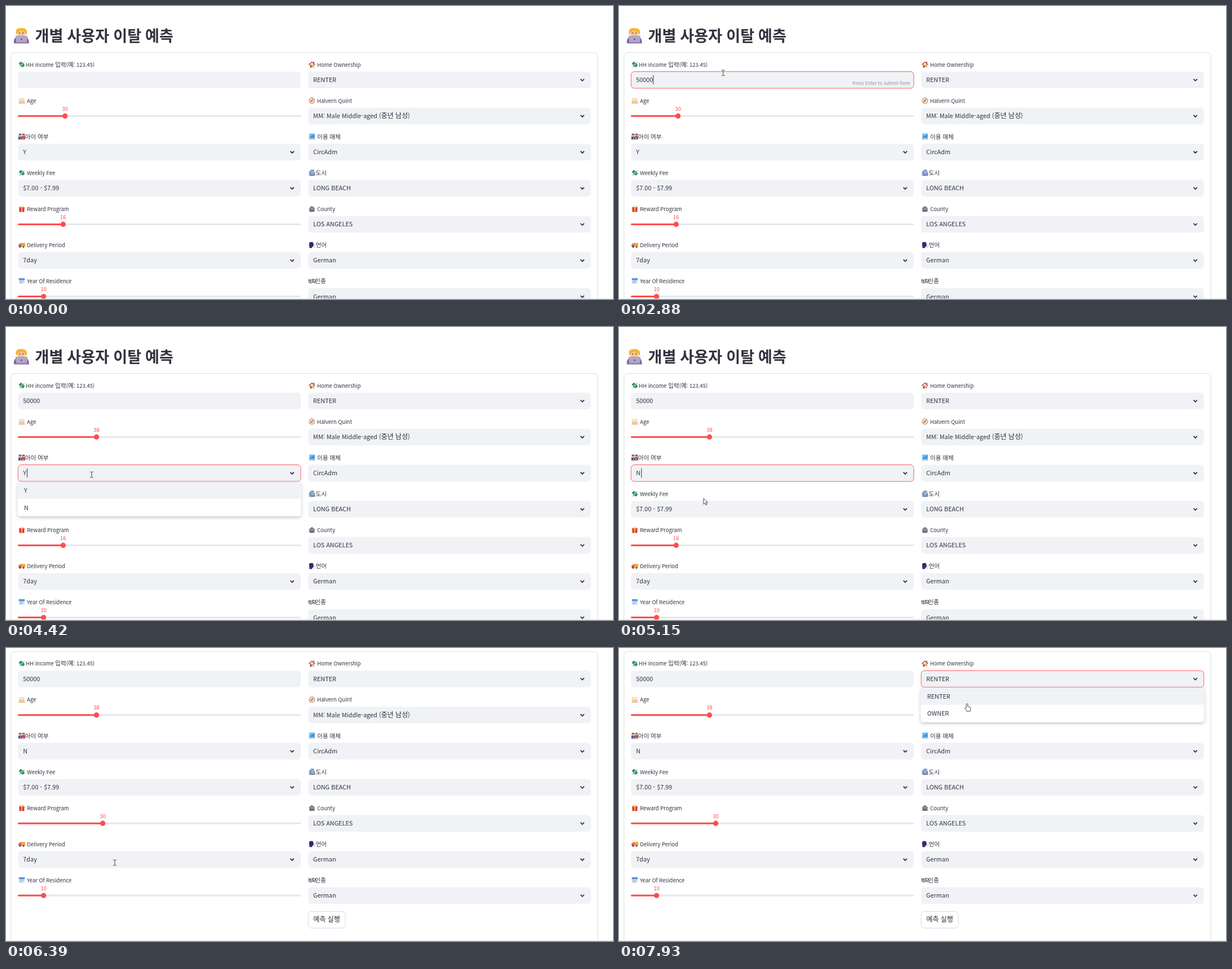
Animation, 1077 px wide and 520 px high, one loop 8 s. Source, as an HTML page:

```html
<!DOCTYPE html>
<html lang="ko">
<head>
<meta charset="utf-8">
<title>개별 사용자 이탈 예측</title>
<style>
html, body { margin: 0; height: 100%; overflow: hidden; background: #fff; }
svg { display: block; width: 100vw; height: 100vh; }
text { font-family: "Noto Sans CJK KR", "Noto Sans CJK", "Noto Sans KR", "Noto Sans", sans-serif; fill: #31333f; white-space: pre; }
.red { fill: #ff4b4b; }
.hint { fill: #8e8f97; }
.menu > .card { fill: #fff; filter: drop-shadow(0 2px 3px #0003); }
</style>
</head>
<body>
<svg id="stage" viewBox="0 0 1077 520"></svg>
<script>
const LOOP = 8000, PITCH = 64.07, WIDTH = 502.3, COLS = [21, 535.8];
const SIZE = 12.13, SMALL = 10.61, LATIN = 0.895;
const $ = id => document.getElementById(id);
const rowY = i => 131.1 + PITCH * i;
const path = (fill, d) => `<path fill="${fill}" d="${d}"/>`;
const dot = (fill, x, y, r) => `<circle fill="${fill}" cx="${x}" cy="${y}" r="${r}"/>`;
const box = (x, y, w, h, attrs) => `<rect x="${x}" y="${y}" width="${w}" height="${h}" ${attrs}/>`;

// Latin runs are set a little smaller than Hangul
const runs = (s, size) => s.replace(/[ -~]+/g, m => `<tspan font-size="${size * LATIN}">${m}</tspan>`);
const text = (x, y, s, size = SIZE, attrs = '') =>
  `<text x="${x}" y="${y}" font-size="${size}" ${attrs}>${runs(s, size)}</text>`;

// Pictograms in a 12 by 12 box
const icons = {
  money: path('#bcc6c8', 'M6 4l5-3-1 6zM4 6l-3 5 6-1z') + path('#2b8f5a', 'M.5 4.5L4.5 .8 11.5 7.5 7.8 11.2z') + dot('#9bd9b4', 6, 6, 1.6),
  cake: path('#f1b45f', 'M2 1.5h1.2V6H2zM5.4 1h1.2v5H5.4zM8.8 1.5H10V6H8.8z') + path('#f7dcbc', 'M1 5h10v6H1z') + path('#d9a673', 'M1 7.5h10v1H1zM0 10.3h12v1H0z'),
  family: path('#3c4f8c', 'M0 6h6v5H0z') + path('#b64a5c', 'M6 6h6v5H6z') + path('#4b3038', 'M.8 1h4.4v4H.8zM6.8 1h4.4v5H6.8z') +
    dot('#e9b48e', 3, 4, 1.8) + dot('#e9b48e', 9, 4, 1.8) + dot('#4b3038', 4, 8, 1.5) + dot('#e9b48e', 4, 8.7, 1.2) + dot('#4b3038', 8, 8, 1.5) + dot('#e9b48e', 8, 8.7, 1.2),
  gift: path('#d9363e', 'M1.5 5h9v6.5h-9z') + path('#f0514b', 'M1 3h10v2.5H1z') + path('#f6b73c', 'M5 3h2v8.5H5zM6 3L2.5 2 4 .2zM6 3l3.5-1L8 .2z'),
  truck: path('#f0a33a', 'M4 2.5h8V9H4z') + path('#e0483e', 'M.3 9V6l1.5-2.5H5V9z') + path('#8cc9ee', 'M1.2 6l1-1.7h1.6V6z') + dot('#4a4550', 3, 9.5, 1.5) + dot('#4a4550', 9, 9.5, 1.5),
  calendar: path('#dbe6f6', 'M.8 1.5h10.4v9.7H.8z') + path('#3f86d8', 'M.8 1.2h10.4V4H.8z') + path('#7aa7de', 'M2.3 5.2h2v1.5h-2zM5 5.2h2v1.5H5zM7.7 5.2h2v1.5h-2zM2.3 8h2v1.5h-2zM5 8h2v1.5H5z'),
  house: path('#7d5a4a', 'M8.3 1H10v4H8.3z') + path('#efc18d', 'M2 5.5h8.4v6H2z') + path('#d1483c', 'M6 .8L12 6l-1 1.2-5-4.4-5 4.4L0 6z') + path('#8a4d3b', 'M3 7.5h2.3v4H3z') + path('#65b4e8', 'M7 7.5h2.2v2H7z'),
  compass: dot('#d89a62', 6, 6, 5.5) + dot('#f3e6d8', 6, 6, 4.1) + path('#e04d45', 'M9 3L7 7 5 5z') + path('#5a77a8', 'M3 9l4-2-2-2z'),
  screen: path('#3c97e0', 'M1.5 .8h9.5v7.7H1.5z') + path('#6fc3f4', 'M1.5 .8H11L1.5 7z') + path('#a9b4c4', 'M.8 8.7h10.7l.3 2.2H.3z'),
  city: path('#88a4c4', 'M.8 3h4v8.5h-4z') + path('#5f7fae', 'M3.7 .7h6v10.8h-6z') + path('#c5dcf2', 'M5 2.2h1.2v7H5zM7.2 2.2h1.2v7H7.2z') + path('#7d8796', 'M9.5 5h2v6.5h-2z'),
  county: path('#807a8a', 'M6 .8L12 5.4H0z') + path('#a09aa8', 'M1.3 5h9.5v6.3H1.3z') + path('#5c5668', 'M2 6h1.6v5H2zM8.4 6H10v5H8.4zM4.7 7.5h2.6v3.8H4.7z'),
  voice: path('#2d3068', 'M1 4Q1 .7 5 .7T8.5 4L9.7 6.5 8.4 7v2L6.5 9.2v2.3H1.5V8Q.8 6 1 4z') + path('#4a4f86', 'M9.6 8l2.2-.5v1zM9.4 9.3l2 1-.4.7z'),
  map: '<path fill="none" stroke="#31333f" stroke-width=".9" d="M.5 3l3 1.3L7.8 2.6 12 4v5.5L8 8 3.8 9.6.5 8.3zM3.5 4.3v5M7.8 2.6V8M1 6l2-1 2 2 2-2 2 2 2-1"/>'
};
const icon = (name, x, y) => `<g transform="translate(${x} ${y})">${icons[name]}</g>`;

// [icon, label, label x, kind, value]
const fields = [[
  ['money', 'HH income 입력(예: 123.45)', 35.3, 'input', ''],
  ['cake', 'Age', 37.2, 'slider', 'age'],
  ['family', '아이 여부', 33.8, 'select', 'Y'],
  ['money', 'Weekly Fee', 37.2, 'select', '$7.00 - $7.99'],
  ['gift', 'Reward Program', 37.2, 'slider', 'reward'],
  ['truck', 'Delivery Period', 37.2, 'select', '7day'],
  ['calendar', 'Year Of Residence', 37.2, 'slider', 'years']
], [
  ['house', 'Home Ownership', 552, 'select', 'RENTER'],
  ['compass', 'Halvern Quint', 552, 'select', 'MM: Male Middle-aged (중년 남성)'],
  ['screen', '이용 매체', 552, 'select', 'CircAdm'],
  ['city', '도시', 549.6, 'select', 'LONG BEACH'],
  ['county', 'County', 552, 'select', 'LOS ANGELES'],
  ['voice', '언어', 549.6, 'select', 'German'],
  ['map', '인종', 548.2, 'select', 'German']
]];

function field([name, label, labelX, kind, value], col, row) {
  const x = COLS[col], y = rowY(row), id = `${col}${row}`;
  const head = icon(name, x + 1, y - 33.4) + text(labelX, y - 23.5, label, SMALL);
  if (kind === 'slider') return head +
    box(x, y - 1.5, WIDTH, 3, 'rx="1.5" fill="#e4e7ef"') +
    box(x, y - 1.5, 0, 3, `rx="1.5" class="red" id="${value}Bar"`) +
    `<circle id="${value}Dot" class="red" cy="${y}" r="4.6"/>` +
    text(0, y - 9.5, '', SMALL, `id="${value}Num" class="red" text-anchor="middle"`);
  const arrow = kind === 'select' ?
    `<path d="M${x + 483.6} ${y - 1.5}l3.2 3.2 3.2-3.2" fill="none" stroke="#31333f" stroke-width="1.8"/>` : '';
  return head + box(x + .3, y - 14.7, WIDTH - .6, 29.6, `id="box${id}" rx="6" fill="#f0f2f6" stroke-width=".9"`) +
    text(x + 9.3, y + 4, value, SIZE, `id="val${id}"`) + arrow;
}

function menu(id, col, row, items) {
  const x = COLS[col] - .6, y = rowY(row) + 15.6;
  return `<g id="${id}" class="menu">` + box(x, y, WIDTH + 1, 61.5, 'rx="5" class="card"') +
    box(x, y, WIDTH + 1, 30.2, `id="${id}Hover" fill="#f0f2f6"`) +
    items.map((s, i) => text(x + 11.6, y + 19.2 + 30.6 * i, s)).join('') + '</g>';
}

const person = path('#f2b632', 'M18 50Q15 39 27 39T37 50z') + dot('#f4c49a', 27.2, 48, 7) +
  path('#f2b632', 'M20 47Q20 40 27 40T35 46Q29 46 26 43 24 46 20 47z') + path('#5a3f3a', 'M23.5 47h1.5v2h-1.5zM29.5 47H31v2h-1.5z') +
  path('#7a5fb0', 'M14 66Q13 56 20 55H35Q41 56 40.500 66z') + path('#b3a5c6', 'M17 52.500h21l-1 12H18z') +
  path('#8d7fa3', 'M14 64.500h27v2H14z') + dot('#6b5d80', 27.500, 59, 1.5);

$('stage').innerHTML = '<g id="page">' + person +
  text(51.5, 62.7, '개별 사용자 이탈 예측', 27.2, 'font-weight="700"') +
  box(8.8, 82.7, 1041.2, 540, 'rx="6" fill="none" stroke="#dcdde0"') +
  fields.map((list, col) => list.map((f, row) => field(f, col, row)).join('')).join('') +
  text(516.5, 140.4, 'Press Enter to submit form', 9.1, 'id="hint" class="hint" text-anchor="end"') +
  box(536.2, 543.7, 65.8, 29.6, 'rx="6" fill="#fff" stroke="#d8d9dd"') + text(545.2, 562.5, '예측 실행') +
  box(0, 0, 1, 16.5, 'id="caret" fill="#31333f"') +
  menu('kidMenu', 0, 2, ['Y', 'N']) + menu('homeMenu', 1, 0, ['RENTER', 'OWNER']) +
  '</g>' + box(0, 519, 1077, 1, 'fill="#e2e3e7"') +
  '<g id="pointer" stroke="#333" stroke-width=".9" fill="#fff" stroke-linejoin="round">' +
  '<circle id="glow" r="9" fill="#ffe81f" fill-opacity=".75" stroke="none"/>' +
  '<path id="arrow" d="M0 0V10.500L2.500 8.300 4.200 12 6 11.200 4.400 7.600H7.500z"/>' +
  '<path id="beam" fill="none" d="M-3-5Q0-5 0-4V4Q0 5-3 5M3-5Q0-5 0-4M0 4Q0 5 3 5"/>' +
  '<path id="hand" d="M-1.300 8V1.200Q-1.300 0 0 0T1.300 1.200V5.200L5 6Q6.800 6.500 6.500 8.500L5.800 12V13.500H-.8V12L-4 8.600Q-3.800 6.900-2.300 7.600z"/>' +
  '<path id="grip" d="M-3.500 0Q-4.500-3.500-2-3.500-1-4.700 .5-3.800 2-4.300 3-3 5-3 4.600 0L3.500 5.500H-2.500L-4.600 2.500Q-5 .5-3.500 0z"/></g>';

// Pointer route: [time, x, y, shape]
const route = [
  [0, 1037, 545, 'arrow'], [70, 1034, 508, 'arrow'], [250, 800, 330, 'arrow'], [450, 420, 130, 'beam'],
  [600, 240, 62, 'beam'], [720, 178, 62, 'beam'], [860, 183, 103, 'beam'], [960, 183, 103, 'beam'],
  [1050, 183, 120, 'beam'], [2870, 183, 120, 'beam'], [3000, 205, 104, 'beam'], [3130, 226, 140, 'arrow'],
  [3300, 195, 188, 'arrow'], [3480, 159, 198, 'hand'], [3650, 159, 198, 'grip'], [3800, 159, 198, 'arrow'],
  [3940, 152, 262, 'beam'], [4430, 152, 262, 'beam'], [4560, 151, 285, 'hand'], [4720, 150, 314, 'hand'],
  [4940, 150, 314, 'arrow'], [5060, 150, 304, 'arrow'], [5170, 150, 304, 'arrow'], [5290, 160, 350, 'arrow'],
  [5420, 172, 383, 'hand'], [5940, 172, 383, 'hand'], [6060, 188.5, 380, 'hand'], [6200, 188.5, 380, 'beam'],
  [6330, 193, 381, 'beam'], [6430, 193, 381, 'beam'], [6520, 200, 380, 'beam'], [6700, 200, 380, 'arrow'],
  [6900, 320, 270, 'arrow'], [7080, 480, 120, 'arrow'], [7240, 592, 56, 'beam'], [7520, 592, 56, 'beam'],
  [7610, 594, 52, 'beam'], [7850, 594, 52, 'beam'], [7880, 602, 70, 'hand'], [7930, 617.5, 98.7, 'hand'],
  [LOOP, 617.5, 98.7, 'hand']
];
const clicks = [[1050, 1180], [3640, 3800], [4290, 4420], [4820, 4940], [5520, 5650], [7360, 7490]];
const keys = [1860, 2010, 2190, 2340, 2480];

const within = (t, a, b) => t >= a && t < b;
const show = (id, on) => $(id).setAttribute('display', on ? 'inline' : 'none');
const set = (id, name, value) => $(id).setAttribute(name, value);

function slider(id, value, min, max) {
  const w = (value - min) / (max - min) * WIDTH;
  set(id + 'Bar', 'width', w);
  set(id + 'Dot', 'cx', COLS[0] + w);
  set(id + 'Num', 'x', COLS[0] + w);
  $(id + 'Num').innerHTML = runs(`${value}`, SMALL);
}

function movePointer(t) {
  const i = route.findLastIndex(k => k[0] <= t);
  const [t0, x0, y0, shape] = route[i], [t1, x1, y1] = route[Math.min(i + 1, route.length - 1)];
  const u = t1 > t0 ? (t - t0) / (t1 - t0) : 0;
  set('pointer', 'transform', `translate(${x0 + (x1 - x0) * u} ${y0 + (y1 - y0) * u})`);
  for (const s of ['arrow', 'beam', 'hand', 'grip']) show(s, s === shape);
  show('glow', clicks.some(([a, b]) => within(t, a, b)));
}

function draw(t) {
  const u = Math.min(1, Math.max(0, (t - 6190) / 180));
  set('page', 'transform', `translate(0 ${-76.2 * u * u * (3 - 2 * u)})`);

  const typed = keys.filter(k => k <= t).length;
  const typing = within(t, 1090, 3680), choosing = within(t, 4330, 5560);
  $('val00').innerHTML = runs('50000'.slice(0, typed), SIZE);
  $('val02').innerHTML = runs(t < 4930 ? 'Y' : 'N', SIZE);
  set('box00', 'stroke', typing ? '#ff4b4b' : within(t, 3680, 3800) ? '#dcdde3' : 'none');
  set('box02', 'stroke', choosing ? '#ff4b4b' : 'none');
  set('box10', 'stroke', t >= 7420 ? '#ff4b4b' : 'none');
  show('hint', typing);

  const since = typing ? (typed ? keys[typed - 1] - 80 : 1090) : t < 4930 ? 4330 : 4930;
  show('caret', (typing || choosing) && (t - since) % 1000 < 500);
  set('caret', 'x', typing ? 30.3 + 6.03 * typed : t < 4930 ? 37 : 39.4);
  set('caret', 'y', rowY(typing ? 0 : 2) - 8.4);

  slider('age', t < 3680 ? 30 : 38, 18, 90);
  slider('reward', t < 5560 ? 16 : 30, 0, 100);
  slider('years', 10, 0, 110);

  show('kidMenu', within(t, 4420, 4930));
  set('kidMenuHover', 'y', rowY(2) + 15.6 + (t < 4660 ? 0 : 30.6));
  show('homeMenu', t >= 7470);
  movePointer(t);
}

function tick() {
  draw(performance.now() % LOOP);
  requestAnimationFrame(tick);
}
tick();
</script>
</body>
</html>
```
